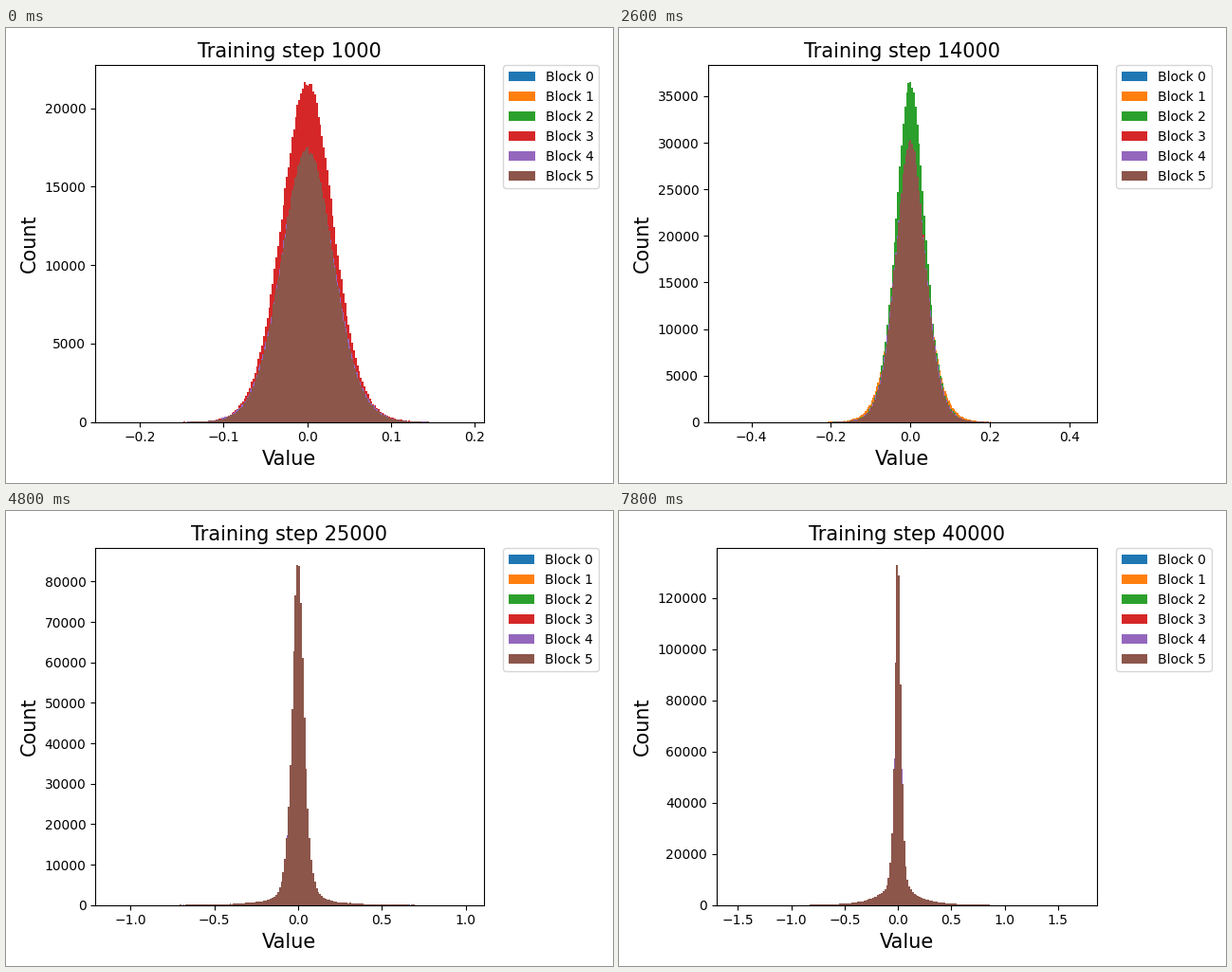
Recreate the animation shown at these times as a matplotlib script. Size 640 by 480 pixels, loop 8 s.

```python
import numpy as np
import matplotlib.pyplot as plt
from matplotlib.animation import FuncAnimation

plt.rcParams["font.family"] = "DejaVu Sans"

FRAMES = 40
INTERVAL = 200
BINS = 200

# Axis limits and highest count at a few steps (in thousands)
STEPS, X_LOW, X_HIGH, TOP = np.transpose([
    (1, -0.2531, 0.2105, 21650),
    (8, -0.4776, 0.4870, 36900),
    (14, -0.5083, 0.4680, 36500),
    (22, -1.0170, 0.9610, 70700),
    (29, -1.4690, 1.3000, 101800),
    (36, -1.6100, 1.5510, 121200),
    (40, -1.7000, 1.8650, 132800),
])

# Last step of each phase, tallest block, height of the others
PHASES = [(4, 3, 0.81), (11, 0, 0.89), (17, 2, 0.83), (FRAMES, 5, 0.80)]


def block_shape(block, step):
    """Height relative to the tallest block, and relative width."""
    leader, share = next(p[1:] for p in PHASES if step <= p[0])
    flare = np.exp(-((step - 11) / 5) ** 2)
    width = [0.93, 1 + 0.18 * flare, 0.98, 1, 1.02, 1][block]
    if block == leader:
        return 1, width
    if block == 1:
        return 0.85 * share, width
    return share * (1 if block == 5 else 0.98), width


def bell(x, step, width):
    """Bell that grows heavier tails and a wide skirt with training."""
    spread = np.interp(step, [1, 10, 22, 29, 40],
                       [0.031, 0.0365, 0.038, 0.0306, 0.027])
    nu = max(5, 18 - 0.5 * step)
    skirt = 0.0032 * max(0, step - 14)
    u = x / (spread * width)
    core = (1 + u**2 / nu) ** (-(nu + 1) / 2)
    return core + skirt * np.exp(-np.abs(x) / 0.172)


def histogram(block, step, low, high, top):
    height, width = block_shape(block, step)
    edges = np.linspace(low * height, high * height, BINS + 1)
    centers = (edges[:-1] + edges[1:]) / 2
    counts = top * height * bell(centers, step, width)
    rng = np.random.default_rng(100 * step + block)
    counts += rng.normal(size=BINS) * np.sqrt(counts)
    counts = np.clip(counts, 0, None)
    return counts * top * height / counts.max(), edges


def arrange(first, y_max):
    if first:
        fig.subplots_adjust(left=0.125, right=0.9, bottom=0.11, top=0.88)
        fig.tight_layout()
    else:
        left = 103 if y_max >= 100000 else 94
        fig.subplots_adjust(left=left / 640, right=504 / 640,
                            bottom=64 / 480, top=441 / 480)
    fig.tight_layout()


def update(i):
    step = i + 1
    x_low, x_high, top = (np.interp(step, STEPS, v)
                          for v in (X_LOW, X_HIGH, TOP))
    margin = (x_high - x_low) * 0.05 / 1.1

    ax.clear()
    for block in range(6):
        counts, edges = histogram(block, step, x_low + margin,
                                  x_high - margin, top)
        ax.stairs(counts, edges, fill=True, color=f"C{block}",
                  linewidth=0, label=f"Block {block}")

    ax.set_xlim(x_low, x_high)
    ax.set_ylim(0, top * 1.05)
    ax.set_title(f"Training step {step * 1000}", fontsize=15)
    ax.set_xlabel("Value", fontsize=15)
    ax.set_ylabel("Count", fontsize=15)
    ax.legend(bbox_to_anchor=(1.05, 1), loc="upper left", borderaxespad=0)
    arrange(i == 0, top * 1.05)
    return []


fig, ax = plt.subplots(figsize=(6.4, 4.8), dpi=100)
anim = FuncAnimation(fig, update, frames=FRAMES, interval=INTERVAL,
                     init_func=lambda: [], repeat=True, repeat_delay=0)
plt.show()
```
